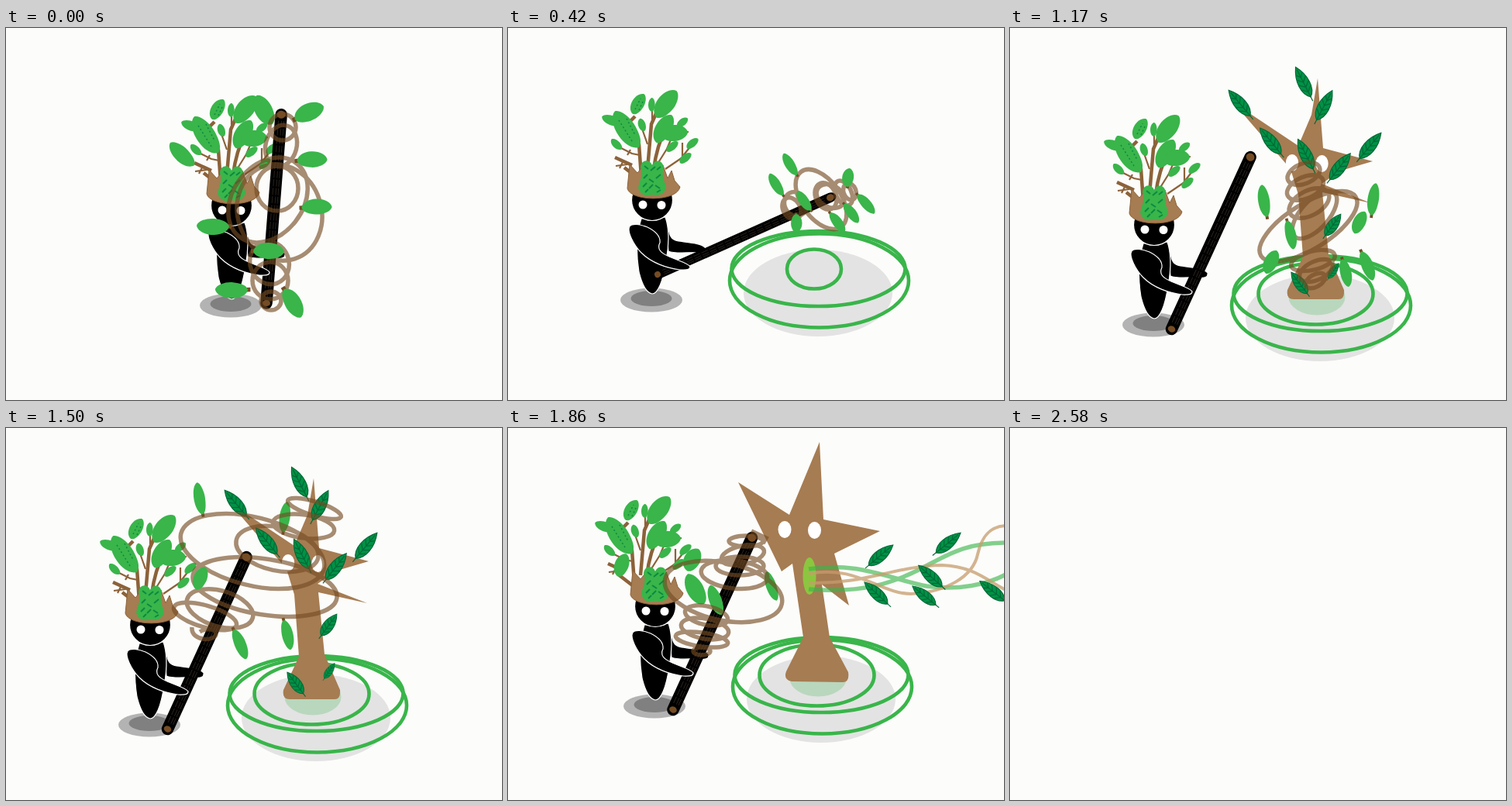
Animation, 640 px wide and 480 px high, one loop 2940 ms. Source, as an HTML page without scripts:

```html
<!DOCTYPE html>
<html lang="en">
<head>
<meta charset="utf-8">
<title>Tree summoner</title>
<style>
html, body { margin: 0; width: 100%; height: 100%; overflow: hidden; background: #fcfcfa; }
svg { display: block; width: 100%; height: 100%; }

.scene { visibility: hidden; animation: 2940ms step-end infinite; }
#hold { animation-name: hold; }
#swing { animation-name: swing; }
#cast { animation-name: cast; }
#sprout { animation-name: sprout; }
#trunk { animation-name: trunk; }
#wake { animation-name: wake; }
#unwind { animation-name: unwind; }
#breathe { animation-name: breathe; }
#breathe2 { animation-name: breathe2; }
@keyframes hold { 0% { visibility: visible } 6.122%, 100% { visibility: hidden } }
@keyframes swing { 0% { visibility: hidden } 6.122% { visibility: visible } 14.286%, 100% { visibility: hidden } }
@keyframes cast { 0% { visibility: hidden } 14.286% { visibility: visible } 20.408%, 100% { visibility: hidden } }
@keyframes sprout { 0% { visibility: hidden } 20.408% { visibility: visible } 28.571%, 100% { visibility: hidden } }
@keyframes trunk { 0% { visibility: hidden } 28.571% { visibility: visible } 39.796%, 100% { visibility: hidden } }
@keyframes wake { 0% { visibility: hidden } 39.796% { visibility: visible } 51.02%, 100% { visibility: hidden } }
@keyframes unwind { 0% { visibility: hidden } 51.02% { visibility: visible } 62.245%, 100% { visibility: hidden } }
@keyframes breathe { 0% { visibility: hidden } 62.245% { visibility: visible } 75.51%, 100% { visibility: hidden } }
@keyframes breathe2 { 0% { visibility: hidden } 75.51% { visibility: visible } 87.755%, 100% { visibility: hidden } }

.vine { fill: none; stroke: #754c24; stroke-width: 5.5; opacity: .63; }
.vine ellipse { transform-box: fill-box; transform-origin: center; }
.ring { fill: none; stroke: #39b54a; stroke-width: 4.6; }
.wood { fill: #a67c52; }
.skin { fill: #000; stroke: #fff; stroke-width: 1.2; }
.twig { fill: none; stroke: #8c6239; }
.eye { fill: #fff; }
.sap { fill: none; stroke: #39b54a; stroke-width: 5.5; opacity: .62; }
.root { fill: none; stroke: #c69c6d; stroke-width: 4; opacity: .75; }
</style>
</head>
<body>
<svg viewBox="0 0 640 480" preserveAspectRatio="none">
<defs>
  <path id="lf" fill="#39b54a" d="M0,20C-7,18-10,9-10,1C-10,-10-5,-19 1,-20C7,-18 10,-6 9,2C8,10 6,18 0,20Z"/>
  <g id="vl"><path d="M-2.500,17h5v6h-5z" fill="#754c24"/><use href="#lf"/></g>
  <g id="dl" stroke="#006837" stroke-width="1.200">
    <path fill="#009245" d="M0,20C-10,12-10,-7 0,-23C10,-7 10,12 0,20Z"/>
    <path fill="none" d="M0,26V-19M-6,7L0,13L6,7M-7,0L0,6L7,0M-6,-7L0,-1L6,-7M-4,-13L0,-8L4,-13"/>
  </g>

  <g id="canopy">
    <g class="twig" stroke-width="4.500">
      <path d="M172,192L169,150L157,121L164,114M180,182L185,124L192,108M188,182Q192,152 204,128M138,167L160,177M150,180L172,197"/>
      <path stroke-width="2.200" d="M140,152L160,162L170,164M154,164L158,157M139,178L154,176M144,181L148,173M190,180L205,156L216,130M203,182L228,165M225,148V166L236,152M180,150L173,130M186,118V105M205,138L233,134"/>
    </g>
    <use href="#lf" transform="translate(168,98)rotate(28)scale(.85,.74)"/>
    <use href="#lf" transform="translate(185.500,99)scale(.45,.45)"/>
    <use href="#lf" transform="translate(204,98)rotate(36)scale(1.200,1.080)"/>
    <use href="#lf" transform="translate(134,119)rotate(-72)scale(.65,.68)"/>
    <use href="#lf" transform="translate(153,131)rotate(-35)scale(1.300,1.400)"/>
    <use href="#lf" transform="translate(173,125)rotate(-20)scale(.5,.43)"/>
    <use href="#lf" transform="translate(201,130)rotate(28)scale(1.100,1.020)"/>
    <use href="#lf" transform="translate(215,136)rotate(80)scale(1.100,.86)"/>
    <use href="#lf" transform="translate(225,122)rotate(48)scale(.48,.44)"/>
    <use href="#lf" transform="translate(140,150)rotate(-48)scale(.5,.46)"/>
    <use href="#lf" transform="translate(238,149)rotate(48)scale(.5,.47)"/>
    <use href="#lf" transform="translate(229,168)rotate(48)scale(.5,.47)"/>
    <use href="#lf" transform="translate(212,153)rotate(48)scale(.5,.47)"/>
    <path fill="none" stroke="#0b8a42" stroke-width="1.500" stroke-dasharray="2 3" d="M164,105L171,91M169,106L175,93M143,119L160,146M153,117L164,138"/>
  </g>

  <g id="hero">
    <ellipse cx="185" cy="351" rx="40" ry="15.500" fill="#b3b3b3"/>
    <ellipse cx="185" cy="349" rx="26.500" ry="10" fill="#808080"/>
    <path class="skin" d="M203,245C210,262 205,272 220,275C235,277 251,278 255,284C256,290 250,291 245,290C235,289 215,292 207,288Z"/>
    <path class="skin" d="M172,246C166,265 165,290 169,315C174,335 180,342 186,343C193,343 200,328 204,300C209,275 207,255 203,244Z"/>
    <circle class="skin" cx="186" cy="222" r="26.500"/>
    <circle class="eye" cx="174" cy="228" r="5.500"/>
    <circle class="eye" cx="198" cy="228.500" r="5.500"/>
    <path class="wood" stroke="#8c6239" d="M157,176L154,207C158,224 218,225 222,205L215,197L211,184L206,194L200,177L190,190L176,176L167,187Z"/>
    <path fill="#39b54a" d="M171,180C172,169 183,169 186,177C190,168 200,171 201,180C198,188 201,196 204,205C202,215 195,217 186,215C178,218 170,215 168,206C170,196 175,190 171,180Z"/>
    <path fill="none" stroke="#0b8a42" stroke-width="2" d="M176,178l5,4M184,184l6,-5M192,183l5,-4M175,194l5,-5M182,195l6,4M191,194l6,-5M174,205l5,-5M182,207l5,-5M190,203l6,4M177,212l4,-4M192,212l5,-3"/>
  </g>

  <path id="arm" class="skin" d="M157,256C160,252 170,253 180,257C190,262 197,268 196,277C192,285 197,290 206,294C218,300 232,303 235,308C235,313 228,312 222,312C205,310 185,303 172,290C162,280 153,262 157,256Z"/>

  <g id="staff">
    <path d="M0,0V-244" stroke="#000" stroke-width="15.500" stroke-linecap="round"/>
    <path d="M-3,-8V-236M1,-8V-236M4,-8V-236" stroke="#3a3028" stroke-width=".7" stroke-dasharray="9 2"/>
    <ellipse rx="5" ry="4" fill="#754c24"/>
    <ellipse cy="-244" rx="5.500" ry="5" fill="#754c24"/>
  </g>
  <g id="ready">
    <use href="#canopy"/><use href="#hero"/>
    <use href="#staff" transform="translate(208.500,356.500)rotate(24.600)"/>
    <use href="#arm"/>
  </g>

  <g id="ground">
    <ellipse cx="400" cy="342" rx="96" ry="56" fill="#e3e3e3"/>
    <ellipse class="ring" cx="401.500" cy="326" rx="115.500" ry="60.500"/>
    <ellipse class="ring" cx="400.500" cy="310.500" rx="112" ry="48.500"/>
  </g>
  <g id="bed">
    <use href="#ground"/>
    <ellipse class="ring" cx="394.500" cy="311" rx="74" ry="39.500"/>
    <ellipse cx="396" cy="315" rx="35" ry="22" fill="#39b54a" stroke="#39b54a" stroke-width="3" opacity=".24"/>
  </g>

  <!-- vine coiled on the upright staff -->
  <g id="coil">
    <g class="vine">
      <ellipse cx="252" cy="121" rx="17" ry="17"/>
      <ellipse cx="250" cy="145" rx="20" ry="27" transform="rotate(15)"/>
      <ellipse cx="245" cy="200" rx="27" ry="29"/>
      <ellipse cx="233" cy="215" rx="45" ry="60" transform="rotate(38)"/>
      <ellipse cx="248" cy="231" rx="54" ry="63" transform="rotate(-18)"/>
      <ellipse cx="235" cy="296" rx="25" ry="28" transform="rotate(-20)"/>
      <ellipse cx="236" cy="319" rx="23" ry="24"/>
      <ellipse cx="237" cy="345" rx="13" ry="12"/>
    </g>
    <use href="#vl" transform="translate(286,102)rotate(64)scale(1.180,1.020)"/>
    <use href="#vl" transform="translate(290,163)rotate(86)scale(1.080,.98)"/>
    <use href="#vl" transform="translate(296,224)rotate(87)scale(1.050,.98)"/>
    <use href="#vl" transform="translate(162,249)rotate(-90)scale(1.100,1.050)"/>
    <use href="#vl" transform="translate(234,281)rotate(90)scale(1.100,1)"/>
    <use href="#vl" transform="translate(186,331)rotate(-91)scale(1.080,1.060)"/>
    <use href="#vl" transform="translate(265,348)rotate(148)scale(1.120,1.060)"/>
  </g>

  <!-- vine circling the trunk -->
  <g id="wrap">
    <g class="vine">
      <ellipse cx="379" cy="156" rx="22" ry="13" transform="rotate(-22)"/>
      <ellipse cx="381" cy="174" rx="25" ry="14" transform="rotate(-24)"/>
      <ellipse cx="386" cy="194" rx="28" ry="16" transform="rotate(-28)"/>
      <ellipse cx="393" cy="209" rx="38" ry="18" transform="rotate(-48)"/>
      <ellipse cx="385" cy="224" rx="72" ry="29" transform="rotate(-32)"/>
      <ellipse cx="391" cy="268" rx="29" ry="12" transform="rotate(-14)"/>
      <ellipse cx="395" cy="281" rx="23" ry="12" transform="rotate(-25)"/>
      <ellipse cx="394" cy="294" rx="14" ry="8" transform="rotate(-30)"/>
    </g>
    <use href="#vl" transform="translate(328,191)rotate(-10)scale(.78,1.050)"/>
    <use href="#vl" transform="translate(469,189)rotate(7)scale(.76,1.050)"/>
    <use href="#lf" transform="translate(451,219)rotate(24)scale(.85,.78)"/>
    <use href="#vl" transform="translate(362,235)rotate(166)scale(.72,.95)"/>
    <use href="#lf" transform="translate(337,270)rotate(24)scale(.92,.82)"/>
    <use href="#vl" transform="translate(461,275)rotate(157)scale(.8,1)"/>
    <use href="#vl" transform="translate(433,284)rotate(166)scale(.76,.92)"/>
  </g>

  <g id="low">
    <use href="#dl" transform="translate(416,223)rotate(36)scale(.9,.8)"/>
    <use href="#dl" transform="translate(374,298)rotate(-37)scale(.9,.8)"/>
    <use href="#dl" transform="translate(417,282)rotate(34)scale(.6,.55)"/>
  </g>
  <g id="stem">
    <path class="wood" d="M343,138L372,126L388,103L414,105L419,169L403,178L414,289L435,327L350,325L373,291L382,270L360,172Z"/>
  </g>
  <g id="tuft">
    <use href="#dl" transform="translate(337,118)rotate(-41)"/>
    <use href="#dl" transform="translate(356,102)rotate(-27)"/>
    <use href="#dl" transform="translate(382,119)rotate(-25)"/>
    <use href="#dl" transform="translate(364,133)rotate(-41)"/>
    <use href="#dl" transform="translate(397,85)rotate(27)"/>
    <use href="#dl" transform="translate(415,99)rotate(41)"/>
    <use href="#dl" transform="translate(423,133)rotate(39)"/>
  </g>

  <g id="tree">
    <path class="wood" d="M288,64L372,120L389,80L397,33L404,123L468,140L427,152L402,169L466,194L403,180L411,260L431,306Q432,318 424,318L366,318Q356,318 358,306L378,263L372,183L362,150Z"/>
    <ellipse class="eye" cx="364" cy="142" rx="8.200" ry="11"/>
    <ellipse class="eye" cx="402.500" cy="143" rx="8.200" ry="11"/>
    <use href="#low"/>
    <use href="#dl" transform="translate(297,66)rotate(-40)"/>
    <use href="#dl" transform="translate(379,39)rotate(-27)"/>
    <use href="#dl" transform="translate(405,69)rotate(28)"/>
    <use href="#dl" transform="translate(337,115)rotate(-39)"/>
    <use href="#dl" transform="translate(382,132)rotate(-27)"/>
    <use href="#dl" transform="translate(425,148)rotate(38)"/>
    <use href="#dl" transform="translate(464,121)rotate(40)"/>
  </g>

  <g id="star">
    <use href="#bed"/>
    <path class="wood" d="M293,62L359,104L398,10L403,110L476,125L417,154L436,221L401,194L411,262L435,307Q437,320 428,320L362,319Q351,317 355,306L377,262L363,167L349,177Z"/>
    <ellipse class="eye" cx="353" cy="123" rx="8.500" ry="11"/>
    <ellipse class="eye" cx="391.500" cy="124" rx="8.500" ry="11"/>
    <ellipse cx="385" cy="183" rx="8.500" ry="24" fill="#8cc63f"/>
    <use href="#canopy" transform="translate(-13)"/>
    <use href="#hero"/>
    <use href="#lf" transform="translate(143,169)rotate(18)scale(.95,.78)"/>
    <use href="#staff" transform="translate(209,355.500)rotate(24.600)"/>
    <use href="#arm"/>
    <use href="#lf" transform="translate(234,162)rotate(25)scale(1.100,.8)"/>
    <use href="#lf" transform="translate(238,200)rotate(-30)scale(1.150,1.100)"/>
    <use href="#lf" transform="translate(264,214)rotate(-22)scale(.85,1.020)"/>
    <use href="#lf" transform="translate(336,196)rotate(-20)scale(.7,1)"/>
    <g class="vine">
      <path d="M310,125L329,134L325,141"/>
      <ellipse cx="303" cy="138" rx="22" ry="7"/>
      <ellipse cx="299" cy="156" rx="28" ry="12" transform="rotate(-12)"/>
      <ellipse cx="295" cy="170" rx="31" ry="12"/>
      <ellipse cx="288" cy="181" rx="43" ry="18" transform="rotate(6)"/>
      <ellipse cx="274" cy="203" rx="77" ry="37" transform="rotate(12)"/>
      <ellipse cx="252" cy="234" rx="28" ry="12" transform="rotate(12)"/>
      <ellipse cx="250" cy="251" rx="31" ry="13" transform="rotate(10)"/>
      <ellipse cx="246" cy="265" rx="34" ry="9" transform="rotate(8)"/>
      <ellipse cx="246" cy="280" rx="11" ry="5"/>
    </g>
  </g>
</defs>

<g class="scene" id="hold" transform="translate(105,7)">
  <use href="#canopy"/>
  <use href="#lf" transform="translate(122,156)rotate(-48)scale(1,1.060)"/>
  <use href="#lf" transform="translate(228,99)rotate(-30)scale(1.180,1.060)"/>
  <use href="#hero"/>
  <use href="#staff" transform="translate(231,348)rotate(4.500)"/>
  <use href="#arm"/>
  <use href="#coil"/>
</g>

<g class="scene" id="swing" transform="translate(47,17)">
  <use href="#canopy"/><use href="#hero"/>
  <use href="#staff" transform="translate(205,335)rotate(40.500)"/>
  <use href="#arm"/>
  <use href="#coil" transform="translate(205,335)rotate(36)translate(-231,-348)"/>
</g>

<g class="scene" id="cast">
  <use href="#ground"/>
  <ellipse class="ring" cx="395" cy="311" rx="35" ry="25.500"/>
  <use href="#canopy"/><use href="#hero"/>
  <use href="#staff" transform="translate(193,318)rotate(66)scale(.8,1)"/>
  <use href="#arm"/>
  <g class="vine">
    <ellipse cx="404" cy="221" rx="44" ry="25" transform="rotate(54)"/>
    <ellipse cx="410" cy="217" rx="13" ry="18" transform="rotate(-25)"/>
    <ellipse cx="416" cy="217" rx="19" ry="14" transform="rotate(30)"/>
    <ellipse cx="371" cy="227" rx="14" ry="16" transform="rotate(-30)"/>
    <ellipse cx="366" cy="233" rx="11" ry="15" transform="rotate(-30)"/>
    <ellipse cx="433" cy="213" rx="10" ry="17" transform="rotate(-25)"/>
    <ellipse cx="441" cy="211" rx="8" ry="11" transform="rotate(-20)"/>
  </g>
  <use href="#vl" transform="translate(364,176)rotate(-33)scale(.66,.82)"/>
  <use href="#vl" transform="translate(346,202)rotate(-33)scale(.66,.82)"/>
  <use href="#vl" transform="translate(382,223)rotate(-36)scale(.66,.76)"/>
  <use href="#vl" transform="translate(372,252)rotate(178)scale(.75,.6)"/>
  <use href="#vl" transform="translate(439,193)rotate(5)scale(.78,.6)"/>
  <use href="#vl" transform="translate(462,227)rotate(137)scale(.66,.82)"/>
  <use href="#vl" transform="translate(443,239)rotate(142)scale(.66,.76)"/>
  <use href="#vl" transform="translate(425,251)rotate(142)scale(.66,.78)"/>
</g>

<g class="scene" id="sprout">
  <use href="#ground"/>
  <ellipse class="ring" cx="395" cy="311" rx="56" ry="33"/>
  <g transform="translate(43,36)scale(.89)">
    <use href="#stem"/><use href="#wrap"/><use href="#tuft"/><use href="#low"/>
  </g>
  <use href="#canopy"/><use href="#hero"/>
  <use href="#staff" transform="translate(200,337)rotate(45)"/>
  <use href="#arm"/>
</g>

<g class="scene" id="trunk" transform="translate(0,9)">
  <use href="#bed"/><use href="#stem"/><use href="#wrap"/><use href="#tuft"/><use href="#low"/>
  <use href="#ready"/>
  <path d="M283,183L300,145" stroke="#754c24" stroke-width="2"/>
</g>

<g class="scene" id="wake" transform="translate(0,32)">
  <use href="#bed"/><use href="#tree"/><use href="#wrap"/><use href="#ready"/>
</g>

<g class="scene" id="unwind" transform="translate(0,32)">
  <use href="#bed"/>
  <use href="#vl" transform="translate(360,83)rotate(7)scale(.72,1)"/>
  <use href="#tree"/><use href="#ready"/>
  <g class="vine">
    <ellipse cx="398" cy="72" rx="36" ry="9" transform="rotate(17)"/>
    <ellipse cx="384" cy="95" rx="40" ry="15" transform="rotate(8)"/>
    <ellipse cx="350" cy="124" rx="54" ry="28" transform="rotate(12)"/>
    <ellipse cx="318" cy="127" rx="95" ry="44" transform="rotate(14)"/>
    <ellipse cx="334" cy="173" rx="94" ry="36" transform="rotate(9)"/>
    <ellipse cx="276" cy="201" rx="44" ry="23" transform="rotate(16)"/>
    <ellipse cx="257" cy="211" rx="42" ry="14" transform="rotate(16)"/>
    <path d="M240,225C238,244 272,244 271,233C270,226 256,227 250,231"/>
  </g>
  <use href="#vl" transform="translate(250,59)rotate(-11)scale(.76,1.050)"/>
  <use href="#lf" transform="translate(251,162)rotate(20)scale(.9,.78)"/>
  <use href="#vl" transform="translate(302,247)rotate(156)scale(.78,1.040)"/>
  <use href="#vl" transform="translate(363,235)rotate(166)scale(.76,.98)"/>
</g>

<g class="scene" id="breathe">
  <use href="#star" transform="translate(4,8)"/>
  <path class="sap" d="M388,208C460,214 500,198 530,183C570,162 590,148 644,148M388,182C450,172 490,194 540,204C580,210 620,202 644,188"/>
  <path class="root" d="M388,188C450,176 480,214 520,214C565,212 600,192 606,163C612,136 625,126 644,126M388,200C460,202 500,178 560,177C600,178 620,198 644,210"/>
  <use href="#dl" transform="translate(480,165)rotate(50)scale(.95)"/>
  <use href="#dl" transform="translate(476,214)rotate(-47)scale(.95)"/>
  <use href="#dl" transform="translate(546,192)rotate(-48)scale(.95)"/>
  <use href="#dl" transform="translate(538,217)rotate(-51)scale(.9)"/>
  <use href="#dl" transform="translate(567,149)rotate(51)scale(.95)"/>
  <use href="#dl" transform="translate(626,211)rotate(-52)scale(.95)"/>
</g>

<g class="scene" id="breathe2">
  <use href="#star" transform="translate(2,30)"/>
  <path class="sap" d="M388,212C440,202 480,218 520,238C560,258 575,290 644,294M386,222C390,258 450,252 480,237C530,210 590,190 644,240"/>
  <path class="root" d="M388,219C450,222 480,176 518,176C565,176 596,202 603,235C608,270 615,295 644,298M388,206C460,200 500,235 550,236C600,234 610,210 644,207"/>
  <use href="#dl" transform="translate(477,173)rotate(38)"/>
  <use href="#dl" transform="translate(480,244)rotate(-38)"/>
  <use href="#dl" transform="translate(539,171)rotate(39)"/>
  <use href="#dl" transform="translate(546,202)rotate(38)"/>
  <use href="#dl" transform="translate(567,267)rotate(-40)"/>
  <use href="#dl" transform="translate(619,231)rotate(-40)"/>
  <use href="#dl" transform="translate(628,181)rotate(42)"/>
</g>
</svg>
</body>
</html>
```
